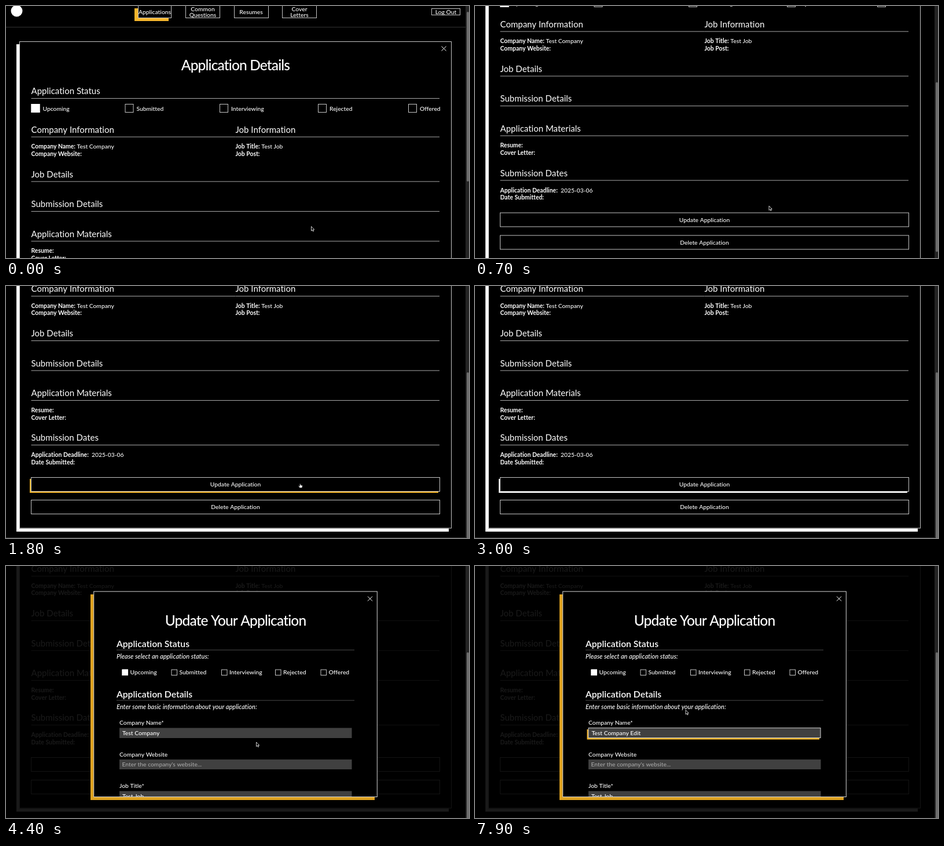
An HTML page with a canvas for the animation above (8 s loop, 800 by 435 pixels).

```html
<!DOCTYPE html>
<html lang="en">
<head>
<meta charset="utf-8">
<style>
html, body { margin: 0; width: 100%; height: 100%; overflow: hidden; background: #000; }
canvas { display: block; }
</style>
</head>
<body>
<canvas id="stage" width="800" height="435"></canvas>
<script>
const ctx = document.getElementById('stage').getContext('2d');
const LOOP = 8000, STEP = 100;
const GOLD = '#f5b52c', DARK_GOLD = '#dda120', FIELD = '#404040', LINE = '#c4c4c4';
const STATES = ['Upcoming', 'Submitted', 'Interviewing', 'Rejected', 'Offered'];
const FONTS = {
  title: '500 24.5px', section: '15px', heading: '600 15.7px',
  body: '500 10.3px', bold: 'bold 10.4px', note: 'italic 500 11px'
};

// Piecewise linear track through [time, value, value...] points
function track(points, t) {
  if (t <= points[0][0]) return points[0].slice(1);
  for (let i = 1; i < points.length; i++) {
    const [a, b] = [points[i - 1], points[i]];
    if (t <= b[0]) {
      const k = (t - a[0]) / (b[0] - a[0]);
      return a.slice(1).map((v, j) => v + (b[j + 1] - v) * k);
    }
  }
  return points[points.length - 1].slice(1);
}

function text(str, x, y, style = 'body', align = 'left', color = '#fff') {
  ctx.font = `${FONTS[style]} Lato, sans-serif`;
  // Any non-zero spacing also turns ligatures off
  ctx.letterSpacing = style === 'title' ? '-.85px' : '.01px';
  ctx.textAlign = align;
  ctx.fillStyle = color;
  ctx.fillText(str, x, y);
}

function rect(x, y, w, h, color) {
  ctx.fillStyle = color;
  ctx.fillRect(x, y, w, h);
}

function frame(x, y, w, h, color = LINE, fill) {
  if (fill) rect(x, y, w, h, fill);
  ctx.strokeStyle = color;
  ctx.lineWidth = 1;
  ctx.strokeRect(x + .5, y + .5, w - 1, h - 1);
}

function section(str, x, y, right, style = 'section') {
  text(str, x, y, style);
  rect(x, y + (style === 'section' ? 7 : 5), right - x, 1, style === 'section' ? '#a8a8a8' : '#4a4a4a');
}

function pair(label, value, x, y) {
  text(label, x, y, 'bold');
  text(value, x + ctx.measureText(label + ' ').width, y);
}

function closeIcon(x, y) {
  ctx.strokeStyle = '#fff';
  ctx.lineWidth = 1;
  ctx.beginPath();
  ctx.moveTo(x - 4, y - 4); ctx.lineTo(x + 4, y + 4);
  ctx.moveTo(x + 4, y - 4); ctx.lineTo(x - 4, y + 4);
  ctx.stroke();
}

function checkboxes(xs, y, size, gap, baseline) {
  STATES.forEach((name, i) => {
    frame(xs[i], y, size, size, i ? LINE : '#fff', i ? '#000' : '#fff');
    text(name, xs[i] + size + gap, baseline);
  });
}

function header() {
  ctx.fillStyle = '#fff';
  ctx.beginPath();
  ctx.arc(18.5, 8.5, 10, 0, 7);
  ctx.fill();
  rect(222, 4, 59, 22, GOLD);
  [228, 310, 394, 477].forEach(x => frame(x, -6, x === 228 ? 58 : 60, 27, LINE, '#000'));
  text('Applications', 257, 13.5, 'body', 'center');
  text('Common', 340, 8.5, 'body', 'center');
  text('Questions', 340, 19, 'body', 'center');
  text('Resumes', 423.5, 13.5, 'body', 'center');
  text('Cover', 507, 8.5, 'body', 'center');
  text('Letters', 507, 19, 'body', 'center');
  frame(735, 4, 50, 12);
  text('Log Out', 760, 13.5, 'body', 'center');
  rect(0, 36, 794, 1, '#333');
}

function details(shadow) {
  rect(18, 66, 747, 566.5, '#fff');
  frame(23, 61, 747, 566, LINE, '#000');
  closeIcon(756.5, 73.5);
  text('Application Details', 396.5, 110.5, 'title', 'center');
  section('Application Status', 43.5, 152, 749);
  checkboxes([43.5, 205.5, 369, 539, 695], 169, 15, 5, 180.5);
  section('Company Information', 43.5, 218.5, 396.5);
  section('Job Information', 396.5, 218.5, 749);
  pair('Company Name:', 'Test Company', 43.5, 246);
  pair('Company Website:', '', 43.5, 258.5);
  pair('Job Title:', 'Test Job', 396.5, 246);
  pair('Job Post:', '', 396.5, 258.5);
  section('Job Details', 43.5, 295.5, 749);
  section('Submission Details', 43.5, 347, 749);
  section('Application Materials', 43.5, 398.5, 749);
  pair('Resume:', '', 43.5, 426);
  pair('Cover Letter:', '', 43.5, 439);
  section('Submission Dates', 43.5, 475.5, 749);
  pair('Application Deadline: ', '2025-03-06', 43.5, 503.5);
  pair('Date Submitted:', '', 43.5, 516);
  if (shadow) rect(41, 541.5, 706, 24, shadow);
  frame(43, 538.5, 707, 25, LINE, '#000');
  text('Update Application', 396.5, 554.5, 'body', 'center');
  frame(43, 577.5, 707, 25);
  text('Delete Application', 396.5, 593.5, 'body', 'center');
  rect(0, 642.5, 794, 1, '#333');
}

function editor(t) {
  rect(146, 49, 491, 355, DARK_GOLD);
  rect(151.5, 43.5, 490, 355.5, '#000');
  ctx.save();
  ctx.beginPath();
  ctx.rect(151, 43, 491, 356);
  ctx.clip();
  closeIcon(629, 56.5);
  text('Update Your Application', 396.5, 103, 'title', 'center');
  section('Application Status', 191, 139.5, 602, 'heading');
  text('Please select an application status:', 191, 159.5, 'note');
  checkboxes([200.5, 285.5, 372, 465, 543.5], 178.5, 10.5, 3.5, 187);
  section('Application Details', 191, 226.5, 602, 'heading');
  text('Enter some basic information about your application:', 191, 246.5, 'note');

  text('Company Name*', 196, 274);
  const focused = t >= 5300;
  if (focused) rect(193.5, 282, 401.5, 17.5, GOLD);
  rect(196, 279.5, 401.5, 17.5, FIELD);
  if (focused) frame(195.5, 279, 402, 18, '#c8c8c8');
  const keyTimes = [6700, 6800, 6900, 7100, 7200];
  const name = 'Test Company' + ' Edit'.slice(0, keyTimes.filter(k => t >= k).length);
  text(name, focused ? 201.5 : 201, 291.5);
  const caret = track([[5500, 0], [5800, 1], [6000, 1], [6400, 0], [6600, 0], [6900, 1], [7600, 1], [7900, 0]], t)[0];
  if (caret) rect(202.5 + ctx.measureText(name).width, 282, 1, 12, `rgba(255,255,255,${caret})`);

  text('Company Website', 196, 328.5);
  rect(196, 334, 401.5, 17, FIELD);
  text('Enter the company\'s website...', 200.5, 346, 'body', 'left', '#a6a6a6');
  text('Job Title*', 196, 383);
  rect(196, 388.5, 401.5, 17, FIELD);
  text('Test Job', 201, 400.5);
  ctx.restore();
  frame(151.2, 43.5, 490.6, 355.5, '#d8d8d8');
}

function scrollbar(scroll) {
  rect(794, 0, 6, 435, '#242424');
  ctx.fillStyle = '#6c6c6c';
  ctx.beginPath();
  ctx.roundRect(796, 10 + scroll * .667, 4, 293, 2);
  ctx.fill();
}

const POINTERS = {
  arrow: ['M0 0V7.6L1.8 6 3 8.6 4.2 8 3 5.5H5.2Z', '#000', '#ddd'],
  hand: ['M-1.5 -3V1L-3 0 -3.5 1 -1.5 4H2.5L3.5 0 0 -1V-3Z', '#fff', '#222'],
  beam: ['M-2 -4Q0 -4 0 -3Q0 -4 2 -4M0 -3V3M-2 4Q0 4 0 3Q0 4 2 4M-1 1H1', 'transparent', '#ddd']
};

function pointer(kind, x, y) {
  const [shape, fill, stroke] = POINTERS[kind];
  const path = new Path2D(shape);
  ctx.save();
  ctx.translate(x, y);
  ctx.lineWidth = .9;
  ctx.fillStyle = fill;
  ctx.strokeStyle = stroke;
  ctx.fill(path);
  ctx.stroke(path);
  ctx.restore();
}

function cursor(t) {
  if (t < 800) pointer('arrow', ...track([[0, 527.5, 380.5], [400, 508, 345]], t));
  else if (t < 2800) pointer('hand', 509, 344.5);
  else if (t >= 4000 && t < 4900) {
    pointer('arrow', ...track([[4000, 503, 335], [4200, 460, 317], [4400, 432.5, 304], [4800, 414, 288]], t));
  } else if (t >= 4900 && t < 6700) pointer('beam', 414, 288);
  else if (t >= 7700) {
    pointer(t < 7800 ? 'beam' : 'arrow', ...track([[7700, 400, 288], [7900, 364, 248.5]], t));
  }
}

function buttonShadow(t) {
  if (t < 800 || t >= 3100) return null;
  if (t >= 2800) return '#fff';
  return t < 1000 ? '#e3a238' : GOLD;
}

function draw(now) {
  const t = Math.floor(now % LOOP / STEP) * STEP;
  const [scroll] = track([[300, 0], [400, 14], [500, 52], [600, 120], [700, 182], [800, 208], [900, 208.5]], t);
  rect(0, 0, 800, 435, '#000');
  ctx.save();
  ctx.translate(0, -scroll);
  header();
  details(buttonShadow(t));
  ctx.restore();
  if (t >= 3100) {
    rect(0, 0, 794, 435, 'rgba(0,0,0,.9)');
    editor(t);
  }
  scrollbar(scroll);
  cursor(t);
  requestAnimationFrame(draw);
}
requestAnimationFrame(draw);
</script>
</body>
</html>
```
